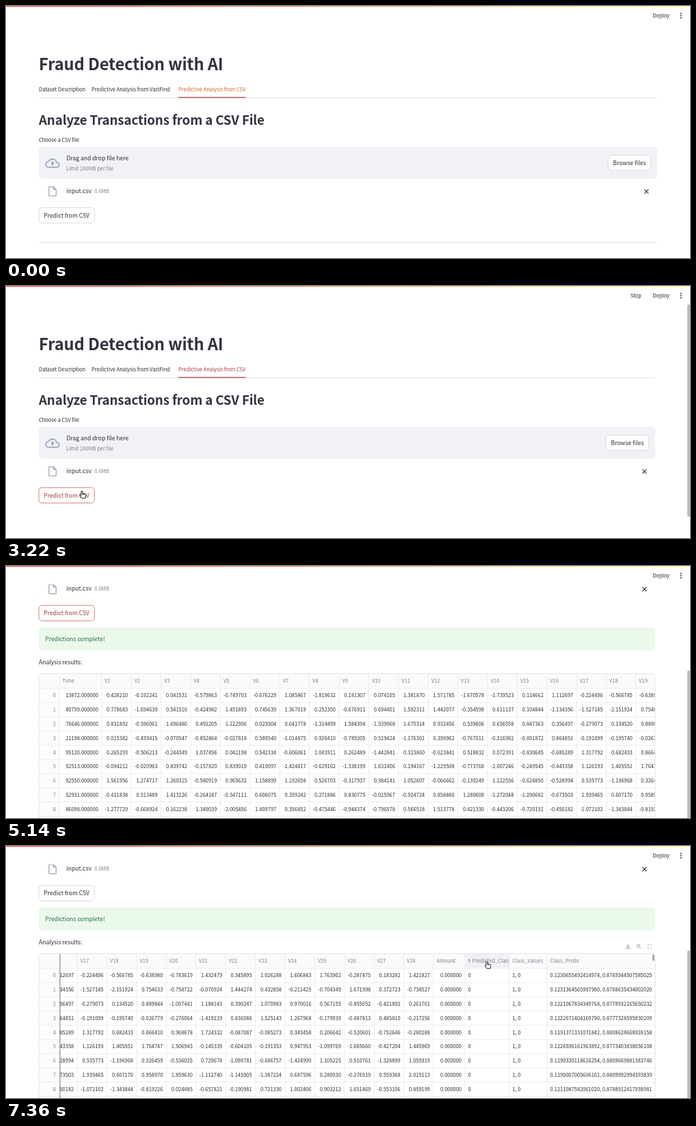
An HTML page with a canvas that plays this animation: 1000 by 369 pixels, repeating every 8000 ms.

```html
<!DOCTYPE html>
<html lang="en">
<head>
<meta charset="utf-8">
<title>Fraud Detection with AI</title>
<style>
  html, body { margin: 0; width: 100%; height: 100%; overflow: hidden; background: #fff; }
  canvas { display: block; width: 1000px; height: 369px; }
</style>
</head>
<body>
<canvas id="stage"></canvas>
<script>
const W = 1000, H = 369, LOOP = 8000;
const canvas = document.getElementById('stage');
const ctx = canvas.getContext('2d');
const dpr = window.devicePixelRatio || 1;
canvas.width = W * dpr;
canvas.height = H * dpr;

const FONT = '"Noto Sans CJK JP", "Noto Sans CJK SC", "Noto Sans CJK", "Open Sans", sans-serif';
const BODY = 8.55, SMALL = 7.47;
const INK = '#282a35', MUTED = '#7f8088', LINE = '#e9e9ed', ICON = '#a3a8b8';
const LEFT = 48, TABLE_TOP = 395, ROW = 20.83, FROZEN = 78, TABLE_RIGHT = 949;

function seededRandom(seed) {
  return () => {
    seed = (seed + 0x6d2b79f5) | 0;
    let n = Math.imul(seed ^ (seed >>> 15), 1 | seed);
    n = (n + Math.imul(n ^ (n >>> 7), 61 | n)) ^ n;
    return ((n ^ (n >>> 14)) >>> 0) / 2 ** 32;
  };
}

const random = seededRandom(7);
const bell = () => 1.8 * (random() + random() + random() - 1.5);

function makeRow() {
  const seconds = 12000 + Math.floor(random() * 160000);
  const features = Array.from({ length: 28 }, () => bell().toFixed(6));
  const prob = 0.119 + 0.006 * random() ** 2;
  return [seconds.toFixed(6), ...features, '0.000000', '0', '1, 0', `${prob.toFixed(16)}, ${(1 - prob).toFixed(16)}`];
}
const rows = Array.from({ length: 9 }, makeRow);

const columns = [
  ['Time', 61.8],
  ...Array.from({ length: 28 }, (_, i) => ['V' + (i + 1), 43.4]),
  ['Amount', 46], ['Predicted_Class', 64.8], ['Class_Values', 55.3], ['Class_Probs', 158],
].map(([name, width]) => ({ name, width }));
columns.reduce((x, c) => (c.x = x) + c.width, FROZEN);

// Bursts of screen updates: first, last, count
const bursts = [[0, 0, 1], [1030, 1760, 9], [1860, 2430, 7], [2650, 3420, 9], [3520, 4270, 9],
  [4680, 5140, 6], [5350, 6120, 9], [6200, 6200, 1], [6500, 7270, 9], [7360, 7360, 1]];

function snap(t) {
  const [first, last, count] = bursts.filter(b => b[0] <= t).pop();
  const step = (last - first) / (count - 1) || 1;
  return first + step * Math.min(count - 1, Math.floor((t - first) / step));
}

const progress = (t, from, to) => Math.min(1, Math.max(0, (t - from) / (to - from)));
const smooth = u => u * u * (3 - 2 * u);

// Each move: start, end, from point, to point
const pointerMoves = [
  [1030, 1540, [662, 134], [34, 306]],
  [1540, 1955, [34, 306], [111, 300]],
  [5350, 5830, [505, 95], [476, 288.5]],
  [6500, 7080, [476, 288.5], [703, 168.5]],
];

function pointerAt(t) {
  const move = pointerMoves.filter(m => m[0] <= t).pop();
  if (!move) return [0, 0];
  const [start, end, from, to] = move;
  const u = smooth(progress(t, start, end));
  return from.map((v, i) => v + (to[i] - v) * u);
}

// Text is placed by the middle of its capitals
function text(str, x, cy, { size = BODY, color = INK, weight = 400, align = 'left', spacing = 0 } = {}) {
  ctx.font = `${weight} ${size}px ${FONT}`;
  ctx.letterSpacing = spacing + 'px';
  ctx.textAlign = align;
  ctx.fillStyle = color;
  ctx.fillText(str, x, cy + size * 0.366);
}

function box(x, y, w, h, fill, border, r = 4.8) {
  ctx.beginPath();
  ctx.roundRect(x, y, w, h, r);
  if (fill) { ctx.fillStyle = fill; ctx.fill(); }
  if (border) { ctx.strokeStyle = border; ctx.lineWidth = 0.9; ctx.stroke(); }
}

function rect(x, y, w, h, color) {
  ctx.fillStyle = color;
  ctx.fillRect(x, y, w, h);
}

function icon(d, x, y, { scale = 1, stroke, fill, width = 1 }) {
  const path = new Path2D(d);
  ctx.save();
  ctx.translate(x, y);
  ctx.scale(scale, scale);
  ctx.lineWidth = width;
  ctx.lineJoin = 'round';
  if (fill) { ctx.fillStyle = fill; ctx.fill(path); }
  if (stroke) { ctx.strokeStyle = stroke; ctx.stroke(path); }
  ctx.restore();
}

function clipped(x, y, w, h, draw) {
  ctx.save();
  ctx.beginPath();
  ctx.rect(x, y, w, h);
  ctx.clip();
  draw();
  ctx.restore();
}

function drawTitles(right, running) {
  text('Fraud Detection with AI', LEFT, 85.4, { size: 23.7, weight: 700, color: '#31333f', spacing: -0.12 });
  text('Dataset Description', LEFT, 122, { size: SMALL });
  text('Predictive Analysis from VastFind', 125, 122, { size: SMALL });
  text('Predictive Analysis from CSV', 252, 122, { size: SMALL, color: running ? '#a8383f' : '#cd6a2c' });
  rect(LEFT, 133.8, right - LEFT, 0.8, '#e0e0e4');
  rect(252, 133.3, 98.3, 1.3, '#bd474b');
  text('Analyze Transactions from a CSV File', LEFT, 167.6, { size: 18.7, weight: 600, color: '#31333f', spacing: -0.12 });
}

function drawUploader(right) {
  text('Choose a CSV file', LEFT, 196.5, { size: SMALL });
  box(LEFT, 206, right - LEFT, 47, '#f0f2f6');
  icon('M6 19H19A4 4 0 0 0 18.6 11A6.7 6.7 0 0 0 6 9A5 5 0 0 0 6 19Z', 57.3, 219.3, { scale: 0.89, stroke: ICON, width: 2 });
  icon('M8 13H10.6V16H13.4V13H16L12 9Z', 57.3, 219.3, { scale: 0.89, fill: ICON });
  text('Drag and drop file here', 88.5, 223);
  text('Limit 200MB per file', 88.5, 238.5, { size: SMALL, color: MUTED });
  box(right - 72, 218.3, 62.5, 22.6, '#fff', '#d6d6d9');
  text('Browse files', right - 40.7, 229.5, { align: 'center' });

  icon('M1.5 .5H7L11 4.5V13Q11 14 10 14H1.5Q.5 14 .5 13V1.5Q.5 .5 1.5 .5ZM7 .5V4.5H11', 62.3, 264.2, { stroke: ICON, width: 1.3 });
  text('input.csv', 88.5, 270.8);
  text('0.6MB', 129.5, 271, { size: SMALL, color: MUTED });
  icon('M-3-3L3 3M3-3L-3 3', right - 15.8, 271.7, { stroke: INK, width: 1.1 });
}

function drawPredictButton(t, hover) {
  const pressed = t >= 2140 && t < 2240;
  const [label, border] = t < 2650 ? ['#d5504f', '#d4595a'] : ['#983c3e', '#cc7672'];
  box(LEFT, 295.2, 81.4, 22.6, pressed ? '#ff4b4b' : '#fff', hover ? border : '#d6d6d9');
  text('Predict from CSV', 88.7, 306.4, { align: 'center', color: pressed ? '#fff' : hover ? label : INK });
}

function drawColumn(col, index, sorted, hovered) {
  const { x, width, name } = col;
  const wordy = index > 29;
  const headY = TABLE_TOP + 11;
  const active = name === 'Predicted_Class';
  clipped(x, TABLE_TOP, width, H, () => {
    if (active && hovered) rect(x, TABLE_TOP, width, 21.2, '#f0f1f4');
    const shift = active && sorted ? 6 : 0;
    if (shift) icon('M0 5V0M-1.7 1.7L0 0L1.7 1.7', x + 6.3, headY - 2.5, { stroke: MUTED, width: 0.8 });
    text(name, x + 4.5 + shift, headY, { size: SMALL, color: MUTED });
    rows.forEach((row, r) => {
      const y = TABLE_TOP + 32 + r * ROW;
      text(row[index], wordy ? x + 4.5 : x + width - 5, y, { size: SMALL, align: wordy ? 'left' : 'right' });
    });
  });
  rect(x + width - 0.4, TABLE_TOP, 0.8, H, LINE);
}

function drawTable(offset, sorted, hovered) {
  const width = TABLE_RIGHT - LEFT;
  ctx.save();
  ctx.beginPath();
  ctx.roundRect(LEFT, TABLE_TOP, width, 260, 4.8);
  ctx.clip();
  rect(LEFT, TABLE_TOP, width, 21.2, '#f9fafb');
  rect(LEFT, TABLE_TOP + 21.5, FROZEN - LEFT, H, '#fcfcfd');
  for (let r = 0; r < 11; r++) rect(LEFT, TABLE_TOP + 21.2 + r * ROW, width, 0.8, LINE);

  clipped(FROZEN, TABLE_TOP, TABLE_RIGHT - FROZEN, H, () => {
    ctx.translate(-offset, 0);
    columns.forEach((col, i) => {
      const x = col.x - offset;
      if (x < TABLE_RIGHT && x + col.width > FROZEN) drawColumn(col, i, sorted, hovered);
    });
  });

  rows.forEach((_, r) => text(String(r), 73, TABLE_TOP + 32 + r * ROW, { size: SMALL, color: MUTED, align: 'right' }));
  rect(FROZEN - 0.4, TABLE_TOP, 0.8, H, LINE);
  if (offset > 0) {
    const shade = ctx.createLinearGradient(FROZEN, 0, FROZEN + 3, 0);
    shade.addColorStop(0, 'rgba(49,51,63,.45)');
    shade.addColorStop(1, 'rgba(49,51,63,0)');
    rect(FROZEN, TABLE_TOP, 3, H, shade);
  }
  ctx.restore();
  box(LEFT, TABLE_TOP, width, 260, null, '#e4e4e8');
}

function drawToolbar() {
  const y = TABLE_TOP - 10.5, style = { stroke: '#8f9199', width: 0.9 };
  icon('M0-3V1M-2-1L0 1L2-1M-2.8 1.5V2.8H2.8V1.5', 909.5, y, style);
  icon('M1-.8A2 2 0 1 0-3-.8A2 2 0 1 0 1-.8M.5 .7L3 3', 925.5, y, style);
  icon('M-2.5-1V-2.5H-1M1-2.5H2.5V-1M2.5 1V2.5H1M-1 2.5H-2.5V1', 941, y, { stroke: '#b0b2b8', width: 0.8 });
  box(945, TABLE_TOP + 1, 3, 9.5, '#a9abb0', null, 1.5);
}

function drawResults(t, right, hovered) {
  box(LEFT, 327.3, right - LEFT, 33.5, '#ebf8ec');
  text('Predictions complete!', 57.3, 344.2, { color: t < 4680 ? '#536a5e' : '#26703f' });
  text('Analysis results:', LEFT, 378);
  drawTable(730 * smooth(progress(t, 5784, 6200)), t >= 7360, hovered);
  if (t >= 5630) drawToolbar();
}

function drawHeader(t) {
  rect(0, 0, W, 27, '#fff');
  const bar = ctx.createLinearGradient(0, 0, W, 0);
  bar.addColorStop(0, 'rgb(255,75,75)');
  bar.addColorStop(1, 'rgb(255,253,128)');
  rect(0, 0, W, 1.2, bar);
  text('Deploy', 945.6, 14.3, { size: SMALL });
  [10.9, 14.2, 17.5].forEach(y => box(985.8, y - 1, 2, 2, INK, null, 1));
  if (t >= 2240 && t < 4170) text('Stop', 929, 14.3, { size: SMALL, align: 'right' });
}

function drawPointer([x, y], hand) {
  if (hand) {
    icon('M-1 1Q0-1 1 1V4L5 5Q6 5.5 5.8 7L5 10.8H0L-3 7Q-3 5.4-1 6.5Z', x, y, { fill: '#fff', stroke: '#222', width: 1 });
    icon('M1 4V6M3 4.6V6.4', x, y, { stroke: '#222', width: 0.8 });
  } else {
    icon('M0 0V9L2.1 7.2L3.5 10.2L5 9.6L3.6 6.6H6.3Z', x, y, { stroke: '#fff', width: 1.2, fill: '#111' });
  }
}

function draw(now) {
  const t = snap(now % LOOP);
  const running = t >= 2650;
  const right = running ? 949.2 : 952.2;
  const scroll = 237.5 * (1 - (1 - progress(t, 4588, 5140)) ** 1.97);
  const pointer = pointerAt(t);
  const onButton = t < 4270 && pointer[0] > 48 && pointer[0] < 130 && pointer[1] > 294;
  const onColumn = t >= 6970;

  ctx.setTransform(dpr, 0, 0, dpr, 0, 0);
  rect(0, 0, W, H, '#fff');

  ctx.save();
  ctx.translate(0, -scroll);
  drawTitles(right, running);
  drawUploader(right);
  drawPredictButton(t, onButton || (t >= 2140 && t < 7260));
  if (!running) rect(LEFT, 346.2, right - LEFT, 0.8, '#dcdce0');
  if (t >= 3520) drawResults(t, right, onColumn);
  ctx.restore();

  drawHeader(t);
  if (running) {
    const top = 27 + scroll * 0.53;
    box(996, top, 4, (scroll ? H + 4 : 338) - top, '#bcbcbe', null, 2);
  }
  if ((t >= 1030 && t < 3900) || t >= 5350) drawPointer(pointer, onButton || onColumn);
}

const start = performance.now();
function tick() {
  draw(performance.now() - start);
  requestAnimationFrame(tick);
}
tick();
</script>
</body>
</html>
```
